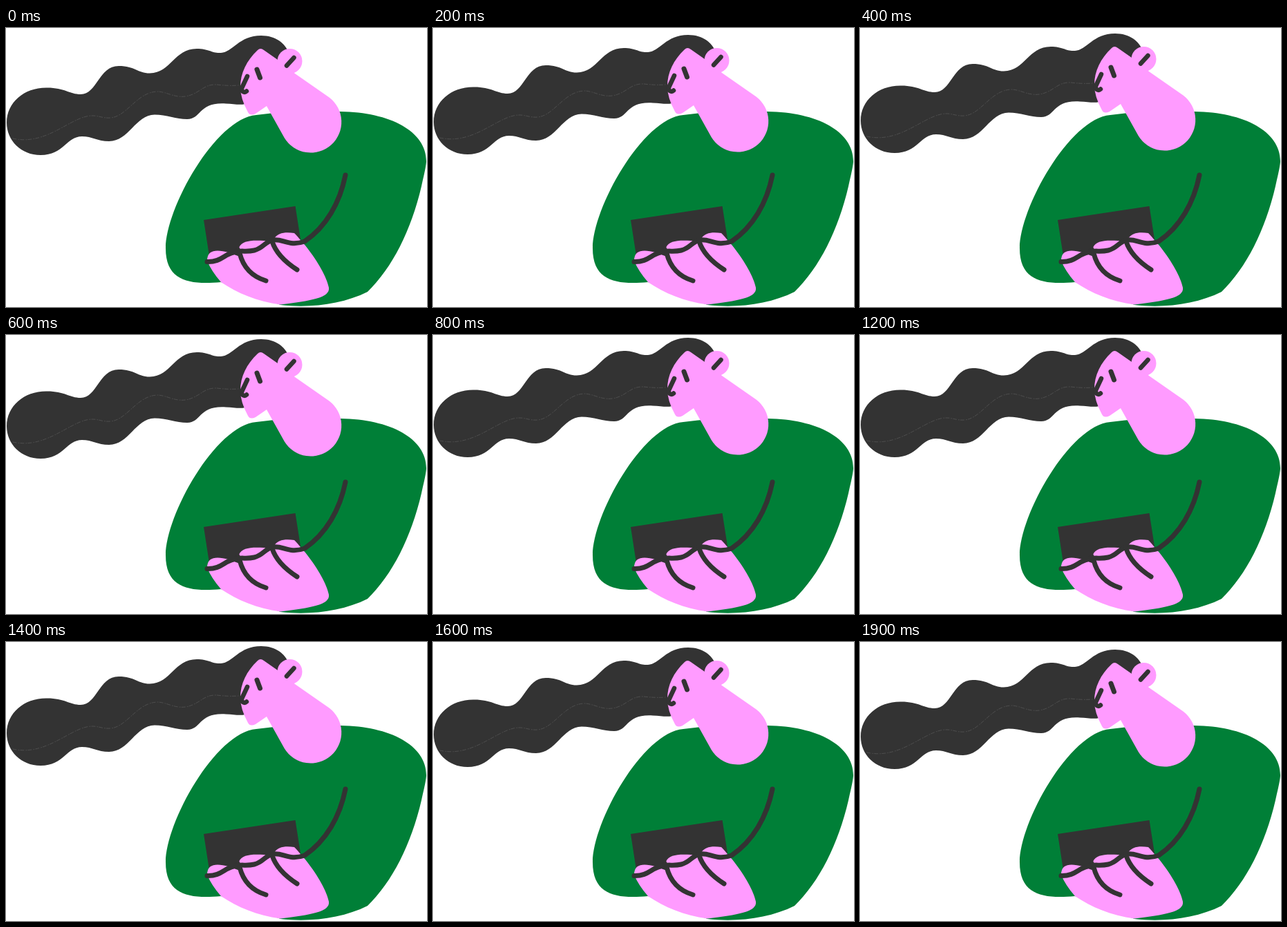
Write an HTML page with a canvas that moves like this. It is 609 px wide and 404 px high and loops after 2.1 s.

```html
<!DOCTYPE html>
<html lang="en">
<head>
<meta charset="utf-8">
<title>Looking up</title>
<style>
html, body { margin: 0; width: 100%; height: 100%; overflow: hidden; background: #fff; }
canvas { display: block; }
</style>
</head>
<body>
<canvas id="stage" width="609" height="404"></canvas>
<script>
const ctx = document.getElementById('stage').getContext('2d');
const DARK = '#333', PINK = '#ff9bff', GREEN = '#007f37';
const LOOP = 2100, STEP = 100, RISE = 9;

const fill = (color, d) => {
  ctx.fillStyle = color;
  ctx.fill(new Path2D(d));
};

const stroke = (d, width = 7, color = DARK) => {
  ctx.strokeStyle = color;
  ctx.lineWidth = width;
  ctx.stroke(new Path2D(d));
};

function drawBody() {
  fill(GREEN, `M362 126 Q420 118 484 121 C556 122 609 150 608 194
    C607 204 604 215 601 229 C586 293 559 347 523 382
    C487 400 440 406 397 401 L311 368 C266 372 231 367 231 319
    C231 261 303 131 362 126Z`);
  fill(DARK, 'M286 278 L418.500 258 L426 306 L384 318 L334 330 L294 330Z');
  fill(PINK, `M291 337 C291 320 306 321 322 325 L338 331 L337 318
    C342 306 361 307 384 309 L388 305 C393 296 405 295 417 297
    C424 304 428 310 433 315 C452 339 464 361 467 376
    C469 391 440 395 397 400.500 C363 396 335 384 311 368 Q297 352 291 337Z`);
  fill(DARK, 'M323 326 L337 317 L342 326 L335 329Z');
  stroke(`M291 338.500 C311 339 315 328 329 325 C340 321 346 325 359 322
    C372 319 375 309 386 307 C402 305 409 317 432 309
    C463 288 483 253 491 213`);
  stroke('M338 326 C343 346 356 360 376 366');
  stroke('M385 309 C390 325 404 339 421 350');
}

function drawHead() {
  fill(DARK, `M1 137 C1 108 26 86.500 58 86.500 C84 86 92 96 108 96
    C132 96 134 55 163 55 C187 55 190 65.500 208 65.500
    C239 65 243 30 276 30 C294 30 298 37 311 36
    C328 35 337 11 369 11 C390 11 404 22 409 36
    L392 60 L346 110 C338 112 330 110 318 109.500
    C278 107 283 132 262 132 C246 132 232 125.500 215 125.500
    C187 126 178 164 149 164 C132 164 125 157 110 157
    C87 157 84 184 50 184 C22 184 1 163 1 137Z`);

  // faint broken seam through the hair
  ctx.setLineDash([5, 3, 1, 2]);
  stroke(`M10 160 C60 171 94 127 125 127 C135 127 140 131 152 130
    C176 127 190 92 220 92 C234 93 243 101 260 99
    C281 95 285 81 305 82 Q321 84 336 83`, 0.6, '#606060');
  ctx.setLineDash([]);

  fill(PINK, `M339 85 C339 66 348 47 364 32 Q368 28 373 32 L393 46 L418 66
    L467.500 100.500 A44.500 44.500 0 1 1 402.800 159.300 L377 113 L361 124
    Q353 128 350 122 Q339 102 339 85Z`);
  fill(PINK, 'M392.500 48 a18 18 0 1 1 36 0 a18 18 0 1 1 -36 0Z');
  stroke('M363 60 L367.500 72');
  stroke('M406 54.500 L416.500 43', 6.5);
  stroke('M349 70 L341.500 86 C339 92 345 94.500 348 91.500', 6.5);
}

const start = performance.now();

function frame() {
  const t = (performance.now() - start) % LOOP;
  const lift = Math.max(0, RISE - Math.abs(Math.floor(t / STEP) - 10));
  ctx.fillStyle = '#fff';
  ctx.fillRect(0, 0, 609, 404);
  ctx.lineCap = ctx.lineJoin = 'round';
  drawBody();
  ctx.save();
  ctx.translate(0, -lift);
  drawHead();
  ctx.restore();
  requestAnimationFrame(frame);
}
frame();
</script>
</body>
</html>
```
